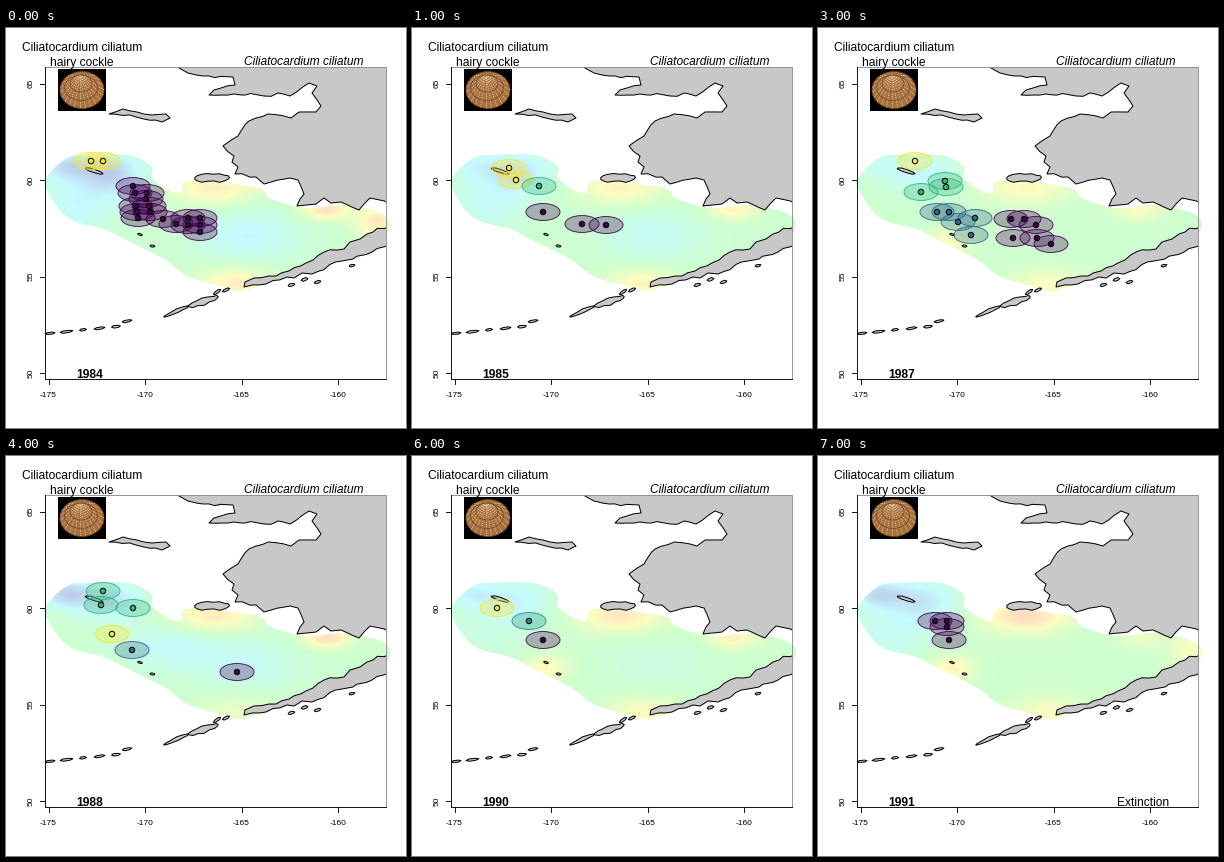
Recreate the animation shown at these times as a matplotlib script. Size 400 by 400 pixels, loop 8 s.

```python
import numpy as np
import matplotlib.pyplot as plt
from matplotlib.animation import FuncAnimation
from matplotlib.colors import LinearSegmentedColormap
from matplotlib.patches import Ellipse, Polygon, Rectangle

PX = 0.72  # points per pixel at 100 dpi
plt.rcParams["font.family"] = ["Liberation Sans", "DejaVu Sans"]
rng = np.random.default_rng(7)

fig = plt.figure(figsize=(4, 4), dpi=100, facecolor="white")
ax = fig.add_axes([0, 0, 1, 1])
ax.set_xlim(0, 400)
ax.set_ylim(400, 0)
ax.axis("off")

frame_box = Rectangle((39, 39), 341, 312, transform=ax.transData)


def text(x, y, s, size=12, **kw):
    kw = {"ha": "center", "va": "baseline", **kw}
    return ax.text(x, y, s, fontsize=size * PX, zorder=9, **kw)


def line(xs, ys, color="black", width=0.9):
    ax.plot(xs, ys, color=color, lw=width * PX, zorder=5)


def rough(points, amount):
    """Split each edge of a closed outline and jitter the new points."""
    out = []
    for a, b in zip(points, np.roll(points, -1, axis=0)):
        parts = max(1, int(np.hypot(*(b - a)) // 6))
        out.append(a)
        for k in range(1, parts):
            out.append(a + (b - a) * k / parts + rng.normal(0, amount, 2))
    return out


def rounded(points, steps=6):
    """Closed Catmull-Rom curve through the points."""
    p = np.array(points, float)
    before, after, later = (np.roll(p, k, axis=0) for k in (1, -1, -2))
    t = np.linspace(0, 1, steps, endpoint=False)[None, :, None]
    a, b, c, d = (q[:, None, :] for q in (before, p, after, later))
    curve = (2 * b + (c - a) * t + (2 * a - 5 * b + 4 * c - d) * t ** 2
             + (3 * b - a - 3 * c + d) * t ** 3) / 2
    return curve.reshape(-1, 2)


def land(points, amount=0.8):
    patch = Polygon(rough(np.array(points, float), amount), fc="#c8c8c8",
                    ec="black", lw=PX, zorder=3, joinstyle="round")
    ax.add_patch(patch)
    patch.set_clip_path(frame_box)


def isle(x, y, w, h, tilt):
    """Small island: a ragged ellipse rising to the right by tilt degrees."""
    a = np.linspace(0, 2 * np.pi, max(6, int(w / 2)), endpoint=False)
    u, v = w / 2 * np.cos(a), h / 2 * np.sin(a)
    v = v * rng.uniform(0.6, 1.2, a.size)
    c, s = np.cos(np.radians(tilt)), np.sin(np.radians(tilt))
    land(np.column_stack([x + u * c + v * s, y - u * s + v * c]), 0.3)


# Mainland coast, Bering Strait to Bristol Bay
land([(390, 30), (165, 30), (173, 40), (182, 45), (197, 48), (227, 49),
      (229, 57), (208, 62), (203, 67), (228, 66), (258, 68), (272, 65),
      (284, 68), (303, 55), (311, 58), (306, 65), (315, 78), (310, 84),
      (293, 84), (285, 90), (262, 86), (243, 93), (232, 108), (217, 118),
      (228, 128), (226, 134), (232, 139), (229, 146), (250, 149),
      (258, 156), (284, 150), (292, 152), (298, 166), (291, 178),
      (310, 176), (318, 170), (325, 175), (335, 174), (353, 182),
      (364, 170), (390, 177)])

# Peninsula
land([(390, 196), (361, 206), (354, 211), (344, 214), (338, 221),
      (318, 224), (307, 232), (283, 243), (270, 248), (248, 250),
      (239, 254), (238, 259), (260, 256), (281, 249), (288, 250),
      (296, 245), (306, 246), (336, 233), (347, 231), (366, 224),
      (390, 213)])

# Large northern island
land([(103, 86), (117, 81), (131, 84), (146, 87), (160, 86), (164, 90),
      (156, 94), (130, 89)], 0.5)

isle(206, 150, 35, 9, 2)
isle(88, 143, 19, 3.5, -17)
isle(134, 206.5, 5, 2, -15)
isle(146.5, 218, 5, 2, -10)
isle(211, 264, 9, 4, 35)
isle(197, 273.5, 32, 7, 18)
isle(170, 283.5, 27, 4, 24)
isle(220, 262, 8, 3, 25)
isle(121, 293, 10, 3, 10)
for k, w in enumerate((9, 11, 7, 13, 10)):
    isle(110 - 16.5 * k, 298.5 + 1.7 * k, w, 2.5, 8)
for k, y in enumerate((257, 251.5, 254)):
    isle(285.5 + 13 * k, y, 7, 3, 15)
isle(346, 237.5, 6, 2.5, 15)

SURVEY = rounded([
    (40, 160), (43, 146), (61, 130), (78, 127), (122, 127), (145, 138),
    (146, 150), (160, 161), (174, 165), (178, 154), (200, 153), (252, 160),
    (265, 171), (300, 180), (340, 177), (380, 188), (380, 206), (357, 213),
    (300, 242), (243, 261), (232, 263), (210, 257), (181, 248), (158, 231),
    (118, 211), (98, 201), (62, 190)])

pastel = LinearSegmentedColormap.from_list(
    "pastel", ["#bccbea", "#c6fbff", "#ceffd0", "#fdfdc0", "#ffd5c4"])
gx, gy = np.meshgrid(np.arange(1, 400, 2), np.arange(1, 400, 2))

# Places where the water is warmer or colder: x, y and spread
SITES = dict(
    corner=(60, 138, 26, 15), north=(105, 145, 34, 21),
    west=(72, 178, 42, 24), middle=(165, 192, 48, 22),
    centre=(242, 208, 52, 24), isle=(208, 160, 42, 16),
    bay=(320, 182, 24, 10), east=(372, 194, 22, 16),
    south=(230, 256, 36, 16), slope=(134, 212, 22, 13))

P, B, T, G, Y = "#440154", "#31688e", "#21908c", "#35b779", "#fde725"
years = []


def add_year(spots, **heats):
    """Catch spots by colour, and a mint field with gaussian patches."""
    v = np.full(gx.shape, 0.5)
    for name, amp in heats.items():
        x, y, sx, sy = SITES[name]
        v += amp * np.exp(-((gx - x) / sx) ** 2 - ((gy - y) / sy) ** 2)
    years.append((spots, v))


add_year({Y: [(85, 133), (97, 133)],
          P: [(127, 158), (129, 165), (141, 165), (140, 171), (130, 178),
              (143, 178), (131, 184), (144, 184), (132, 190), (157, 191),
              (170, 196), (182, 190), (194, 190), (182, 197), (194, 197),
              (194, 204)]},
         corner=-.36, north=-.46, west=-.24, centre=-.26, isle=.34,
         bay=.42, east=.38, south=.34)
add_year({Y: [(97, 140), (104, 152)], G: [(127, 158)],
          P: [(131, 184), (170, 196), (194, 197)]},
         corner=-.2, north=-.38, west=-.2, centre=-.2, isle=.3, bay=.3,
         south=.3)
add_year({Y: [(99, 146), (100, 153), (96, 156), (104, 165), (127, 158)],
          T: [(180, 184)], P: [(195, 204), (183, 210)]},
         corner=-.2, north=-.44, west=-.18, middle=-.2, centre=-.1,
         isle=.22, south=.26)
add_year({Y: [(97, 133)], G: [(127, 153), (128, 159), (103, 164)],
          B: [(119, 184), (131, 184), (140, 194), (157, 190), (153, 207)],
          P: [(193, 191), (206, 191), (218, 197), (195, 210), (219, 210),
              (233, 216)]},
         corner=-.14, north=-.26, isle=.28, bay=.26, south=.25, slope=.26)
add_year({G: [(97, 135), (95, 149), (127, 152)], Y: [(106, 178)],
          B: [(126, 194)], P: [(231, 216)]},
         corner=-.42, north=-.36, middle=-.22, centre=-.2, isle=.36,
         bay=.44, south=.16)
add_year({Y: [(85, 133)], T: [(85, 162)], P: [(194, 184)]},
         north=-.22, centre=-.2, isle=.34, bay=.34, south=.2, slope=.3)
add_year({Y: [(85, 152)], T: [(117, 165)], P: [(131, 184)]},
         corner=-.26, north=-.26, west=-.1, centre=-.1, isle=.38, bay=.32,
         south=.24, slope=.28)
add_year({P: [(117, 165), (129, 165), (129, 171), (131, 184)]},
         corner=-.38, north=-.34, west=-.2, isle=.46, bay=.16, east=.24,
         south=.24, slope=.3)

# Shell picture
ax.add_patch(Rectangle((52, 41), 48, 42, fc="black", ec="none", zorder=6))
shell = Ellipse((76, 62), 44, 37, fc="#a8713f", ec="#6b4323", lw=0.8 * PX,
                zorder=7)
ax.add_patch(shell)
for a in np.linspace(0.05, np.pi - 0.05, 19):
    ray, = ax.plot([74, 74 + 45 * np.cos(a)], [47, 47 + 45 * np.sin(a)],
                   color="#e6c69a", lw=0.8 * PX, ls=(0, (1.6, 1.2)), zorder=8)
    ray.set_clip_path(shell)
for r in (0.5, 0.75):
    ax.add_patch(Ellipse((75, 47 + 17 * r), 44 * r, 34 * r, fc="none",
                         ec="#6b4323", lw=0.7 * PX, zorder=8))

# Plot frame, ticks and labels
line([39, 380, 380], [39, 39, 351], "#8c8c8c")
line([39, 39, 380], [39, 351, 351])
for k in range(4):
    x, y = 42.5 + 96.5 * k, 55.5 + 96.5 * k
    line([x, x], [351, 356])
    line([34, 39], [y, y])
    text(x, 369, str(-175 + 5 * k), 8.4)
    text(25, y, str(65 - 5 * k), 8.4, rotation=90, va="center")

text(76, 23, "Ciliatocardium ciliatum")
text(76, 38, "hairy cockle")
text(298, 37, "Ciliatocardium ciliatum", style="italic")
year_label = text(83.5, 350, "", weight="bold")
event_label = text(325, 350, "")

heat = ax.imshow(years[0][1], cmap=pastel, vmin=0, vmax=1, zorder=1,
                 extent=(0, 400, 400, 0), interpolation="bilinear",
                 aspect="auto")
heat.set_clip_path(Polygon(SURVEY, transform=ax.transData))
ax.set_xlim(0, 400)
ax.set_ylim(400, 0)

marks = []


def add_mark(x, y, w, h, zorder, **kw):
    mark = Ellipse((x, y), w, h, zorder=zorder, lw=PX, **kw)
    marks.append(ax.add_patch(mark))


def update(i):
    while marks:
        marks.pop().remove()
    spots, warmth = years[i]
    heat.set_data(warmth)
    for color, places in spots.items():
        for x, y in places:
            add_mark(x, y, 34, 17, 4, fc=(color, 0.3), ec=(color, 0.85))
            add_mark(x, y, 5.4, 5.4, 4.5, fc=color, ec="black")
    year_label.set_text(str(1984 + i))
    event_label.set_text("Extinction" if i == len(years) - 1 else "")
    return marks


anim = FuncAnimation(fig, update, frames=len(years), interval=1000,
                     repeat=True, repeat_delay=0, blit=False)
plt.show()
```
